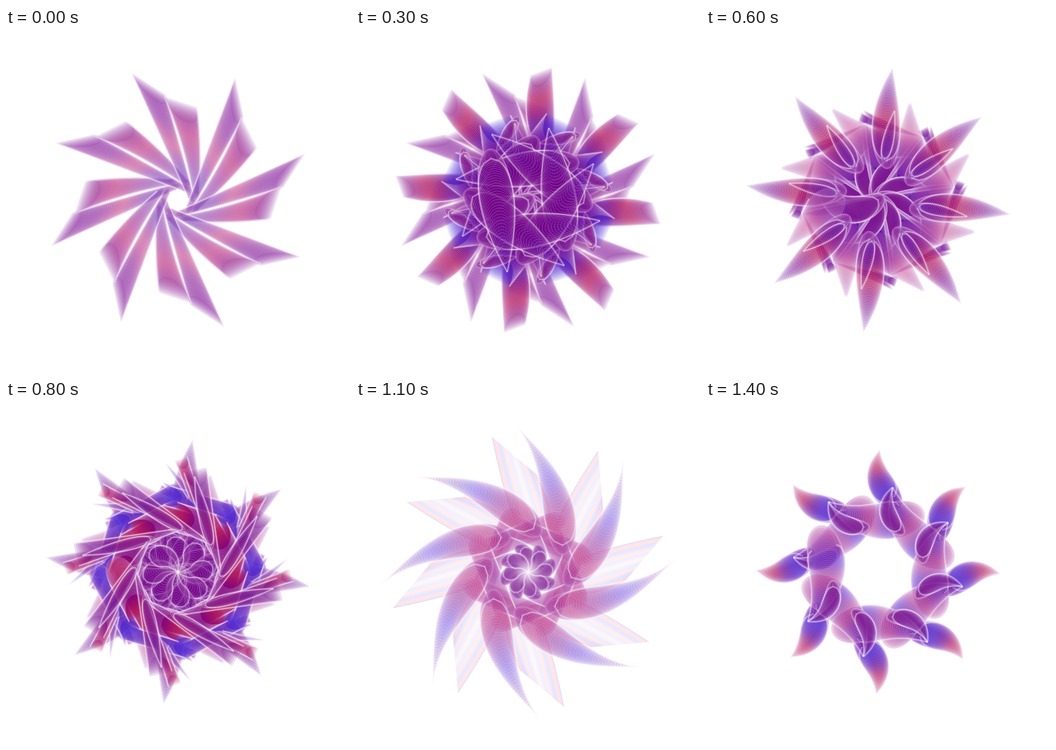
Recreate the animation shown at these times as an HTML page with a canvas. Size 540x540 px, loop 1500 ms.

```html
<!DOCTYPE html>
<html lang="en">
<head>
<meta charset="utf-8">
<title>Eightfold bloom</title>
<style>
html, body { margin: 0; width: 100%; height: 100%; overflow: hidden; background: #fff; }
canvas { display: block; width: 540px; height: 540px; }
</style>
</head>
<body>
<canvas id="stage" width="540" height="540"></canvas>
<script>
const SIZE = 540, FOLD = 8, STEP = 100, LOOP = 1500;

const plum = [112, 0, 130], mauve = [142, 50, 158], red = [185, 25, 85],
      pink = [195, 65, 130], blue = [75, 45, 215], violet = [95, 25, 170];

let g;   // context being drawn on

const mix = (a, b, t) => a + (b - a) * t;
const rgba = (c, a) => `rgba(${c.map(Math.round)},${a})`;

function ramp(cols, t) {
  const p = t * (cols.length - 1), i = Math.floor(p);
  const next = cols[Math.min(i + 1, cols.length - 1)];
  return cols[i].map((v, k) => mix(v, next[k], p - i));
}

// Swelling from a sharp tip (0) to a round end (1), at most 1
function belly(t, sharp) {
  const f = u => u ** sharp * Math.sqrt(1 - u);
  return f(t) / f(sharp / (sharp + 0.5));
}

// A bowed band between two points around the centre.
// Returns a function giving the spot at t along it and s (-1 to 1) across it.
function band([x, y], [X, Y], { w0 = 0, w1 = 0, swell = 0, sharp = 1, bow = 0, slant = 0 }) {
  const len = Math.hypot(X - x, Y - y), ux = (X - x) / len, uy = (Y - y) / len;
  return (t, s) => {
    const arc = bow * 4 * t * (1 - t);
    const turn = Math.atan2(bow * 4 * (1 - 2 * t), len);
    const c = Math.cos(turn), n = Math.sin(turn);
    const dx = ux * c - uy * n, dy = uy * c + ux * n;
    const width = mix(w0, w1, t) + swell * belly(t, sharp);
    const across = s * width / 2, along = -s * slant * (1 - t);
    return {
      x: mix(x, X, t) - uy * arc - dy * across + dx * along,
      y: mix(y, Y, t) + ux * arc + dx * across + dy * along,
      dx, dy, width
    };
  };
}

function rail(at, s) {
  const path = new Path2D();
  for (let i = 0; i <= 30; i++) {
    const p = at(i / 30, s);
    path.lineTo(p.x, p.y);
  }
  return path;
}

function line(path, color, width) {
  g.strokeStyle = color;
  g.lineWidth = width;
  g.stroke(path);
}

// Scalloped blade: translucent arcs sweeping down a band, with light edges
function blade(from, to, { cols, a = 0.13, n = 50, ...shape }) {
  const at = band(from, to, shape), arcs = [];
  for (let i = 0; i <= n; i++) {
    const t = i / n, l = at(t, 1), r = at(t, -1);
    const dip = 4 + l.width * 0.95, vx = l.dx * dip, vy = l.dy * dip;
    const arc = new Path2D();
    arc.moveTo(l.x, l.y);
    arc.bezierCurveTo(l.x + vx, l.y + vy, r.x + vx, r.y + vy, r.x, r.y);
    arcs.push(arc);
    g.fillStyle = rgba(ramp(cols, t), a);
    g.fill(arc);
  }
  arcs.forEach((arc, i) => line(arc, i % 2 ? 'rgba(255,170,200,.4)' : 'rgba(190,190,255,.4)', 0.7));
  for (const s of [-1, 1]) {
    const edge = rail(at, s);
    line(edge, 'rgba(255,255,255,.18)', 3.5);
    line(edge, 'rgba(255,250,255,.55)', 1);
  }
}

// Pale leaf made of lengthwise threads, faint in the middle
function veil(from, to, shape, n = 36) {
  const at = band(from, to, shape);
  for (let i = 0; i <= n; i++) {
    const s = mix(-1, 1, i / n), a = 0.12 + 0.3 * Math.abs(s);
    line(rail(at, s), rgba(i % 8 < 4 ? [255, 110, 130] : [100, 105, 255], a), 0.8);
  }
}

const petal = r => blade([0, 0], [r, -r / 3],
  { swell: r * 0.7, bow: r / 4, cols: [mauve, plum, plum], n: 24 });

const pinwheel = () => {
  blade([-46, -182], [20, -7],
    { w0: 37, w1: 10, slant: 25, cols: [mauve, mauve, pink, violet, plum], a: 0.17 });
  blade([4, -154], [28, -13],
    { w0: 44, w1: 10, slant: 15, bow: -4, cols: [mauve, pink, mauve, violet] });
};

const fins = () => blade([21, -202], [25, -88],
  { w0: 32, w1: 12, swell: 24, bow: 4, slant: -8, cols: [mauve, red, violet, plum] });

const belt = () => {
  blade([52, -125], [20, -60], { w0: 50, w1: 80, cols: [blue, violet, mauve, plum], a: 0.07 });
  blade([18, -89], [75, -101], { swell: 18, cols: [red, plum], n: 24 });
};

const spikes = () => blade([-57, -103], [87, 5], { swell: 54, cols: [violet, plum, plum] });

const ring = () => {
  blade([-29, -129], [26, -109], { w0: 16, cols: [mauve, violet, plum], a: 0.2 });
  blade([-17, -128], [70, -98], { w0: 20, slant: -10, cols: [mauve, pink, violet], a: 0.16 });
};

const swirl = () => {
  blade([25, -110], [0, 0], { w0: 95, w1: 10, cols: [plum, violet, plum, pink], a: 0.07 });
  blade([70, -50], [0, 0], { w0: 20, swell: 34, bow: 22, cols: [mauve, plum, plum] });
};

const star = () => {
  blade([50, -152], [50, -75], { w0: 4, w1: 56, cols: [mauve, pink, mauve], a: 0.06 });
  blade([23, -208], [14, -62], { swell: 44, bow: 5, cols: [violet, plum, red, plum, mauve] });
  blade([26, -140], [10, -65], { swell: 17, cols: [plum, violet], n: 30 });
};

const octagon = () => {
  blade([-18, -120], [78, -92], { w0: 32, w1: 32, cols: [blue, violet, blue] });
  blade([-8, -88], [55, -68], { w0: 45, w1: 45, cols: [red, plum, red] });
  blade([-20, -171], [22, -120], { w1: 16, cols: [blue], a: 0.07 });
  blade([5, -178], [25, -120], { w0: 20, w1: 16, cols: [red], a: 0.06 });
};

const rosette = () => petal(48);

const lances = () => {
  blade([27, -160], [66, 0], { w0: 36, w1: 4, cols: [plum, plum, red, mauve, mauve] });
  blade([26, -150], [52, -42], { swell: 18, cols: [plum] });
};

const veils = () => veil([-22, -183], [10, -75], { w0: 49, w1: 46, swell: 12, slant: 37 });

const frame = () => blade([-20, -70], [75, -30],
  { w0: 34, w1: 34, cols: [pink, mauve, pink], a: 0.07 });

const core = () => petal(34);

const horns = () => blade([-17, -228], [54, -42],
  { swell: 48, sharp: 1.6, bow: -18, cols: [plum, violet, blue, mauve, pink, mauve], a: 0.1 });

const tubes = () => {
  blade([23, -133], [87, -33],
    { w1: 40, swell: 28, bow: 15, cols: [plum, violet, pink, blue, pink], a: 0.09 });
  blade([23, -133], [34, -66], { swell: 27, bow: 14, cols: [plum] });
};

const feathers = () => blade([3, -192], [22, -115],
  { w1: 8, swell: 36, bow: 12, cols: [pink, red, violet, blue, plum] });

// Each scene lasts one step; layers pile up until the stage is wiped
const pile = layers => layers.map((_, i) => layers.slice(0, i + 1));
const scenes = [
  ...pile([pinwheel, fins, belt]),
  [pinwheel, fins, belt, swirl, spikes],
  ...pile([ring, swirl, star, octagon]),
  [ring, swirl, star, octagon, rosette, lances],
  ...pile([veils, frame, horns]).map(layers => [...layers, core]),
  [veils, frame, horns, core, rosette],
  [tubes],
  [feathers, tubes]
];

function render(layers) {
  const c = document.createElement('canvas');
  c.width = c.height = SIZE;
  g = c.getContext('2d');
  g.fillStyle = '#fff';
  g.fillRect(0, 0, SIZE, SIZE);
  g.translate(SIZE / 2, SIZE / 2);
  // the lower left copy comes last and lies on top
  g.rotate(-Math.PI / 2);
  for (const layer of layers) {
    for (let k = 0; k < FOLD; k++) {
      layer();
      g.rotate(2 * Math.PI / FOLD);
    }
  }
  return c;
}

const stage = document.getElementById('stage').getContext('2d');
const pictures = scenes.map(render);

function show() {
  const i = Math.floor(performance.now() % LOOP / STEP);
  stage.drawImage(pictures[i], 0, 0);
  requestAnimationFrame(show);
}
show();
</script>
</body>
</html>
```
